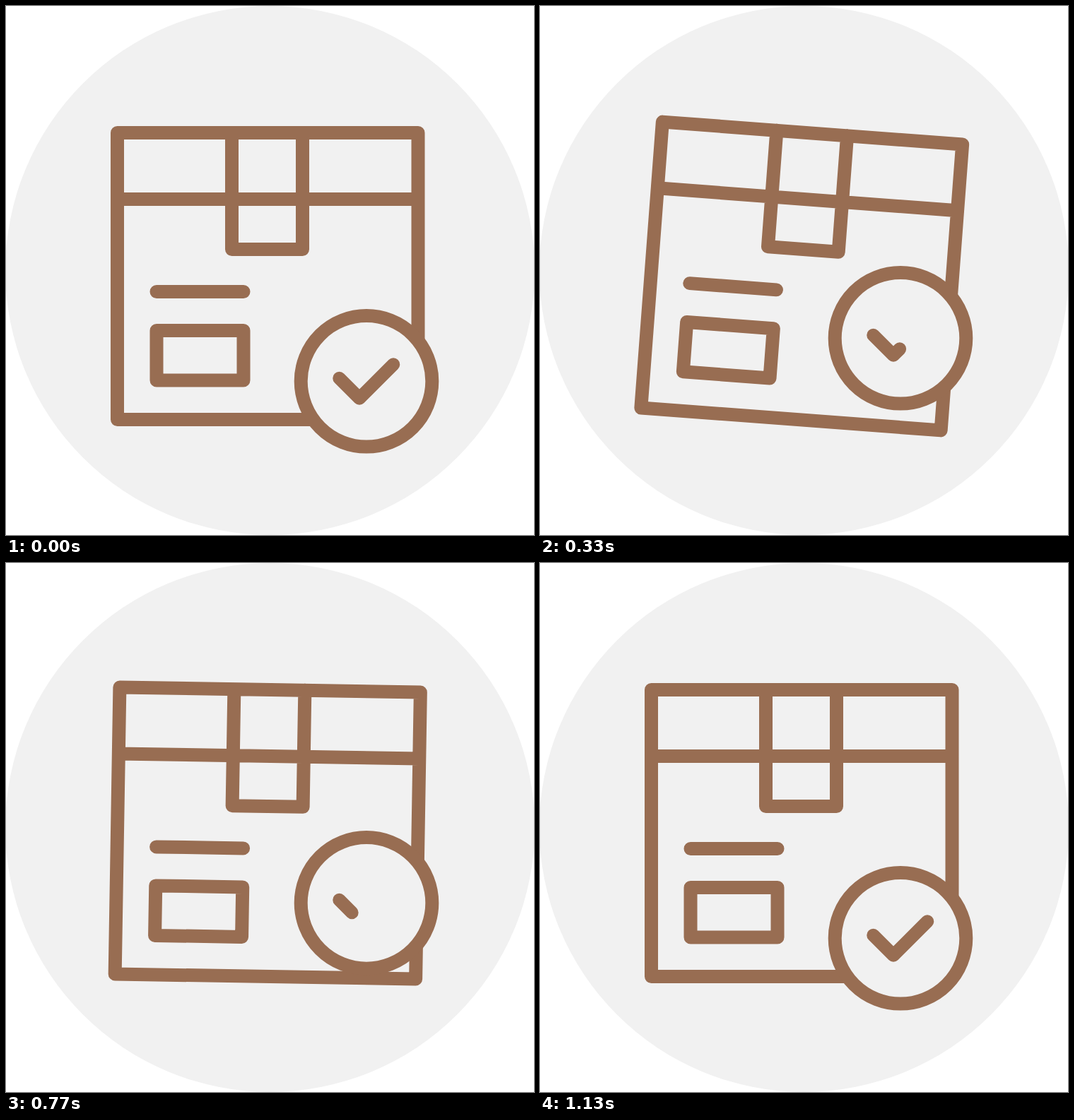
An HTML page that plays this animation: 747 px wide and 749 px high, repeating every 1670 ms.

```html
<!DOCTYPE html>
<html lang="en">
<head>
<meta charset="utf-8">
<title>Parcel delivered</title>
<style>
  html, body { margin: 0; width: 100%; height: 100%; overflow: hidden; background: #fff; }
  svg { display: block; width: 747px; height: 749px; }
  .ink { fill: none; stroke: #986d52; stroke-width: 19; stroke-linecap: round; stroke-linejoin: round; }
</style>
</head>
<body>
<svg viewBox="0 0 747 749">
  <circle cx="373.5" cy="374.5" r="374.5" fill="#f1f1f1"/>
  <g id="box" class="ink">
    <path d="M157.5 179.5H583V585.5H157.5Z M157.5 273.5H583 M319.5 179.5V344.5H419.5V179.5"/>
    <path d="M213 404.5H336 M213 459.5H336V530H213Z"/>
    <path id="corner" d="M574 576h-20l20-20z" fill="#986d52" stroke="none"/>
  </g>
  <g id="badge" class="ink">
    <circle cx="510" cy="531.3" r="92.8" fill="#f1f1f1"/>
    <path id="check" d="M471.5 527L500 555.5L548 507.5" pathLength="1" stroke-width="18.5"/>
  </g>
</svg>
<script>
const LOOP = 1670, FPS = 30;
const CX = 370.25, CY = 382.5;

// Keys are [step, value] pairs, joined by sine easing.
const TILT = [[4.4, 0], [11.8, 5], [18.7, -3.95], [25, 2.4], [30, 0]];
const LIFT = [[2, 0], [10, -61], [18, -14], [26, -66], [34, 0]];
const DRAWN = [[3, 1], [16.8, 0], [18.5, 0], [32.5, 1]];

const [box, corner, badge, check] =
  ["box", "corner", "badge", "check"].map(id => document.getElementById(id));

function at(keys, n) {
  if (n <= keys[0][0]) return keys[0][1];
  for (let i = 1; i < keys.length; i++) {
    const [a, from] = keys[i - 1], [b, to] = keys[i];
    if (n < b) return from + (to - from) * (1 - Math.cos(Math.PI * (n - a) / (b - a))) / 2;
  }
  return keys[keys.length - 1][1];
}

// Distance from the badge centre to the inner bottom-right corner of the box
function cornerGap(tilt, lift) {
  const r = tilt * Math.PI / 180, c = Math.cos(r), s = Math.sin(r);
  const x = CX + 203.25 * c - 193.5 * s, y = CY + 203.25 * s + 193.5 * c;
  return Math.hypot(x - 510, y - 531.3 - lift);
}

function draw(now) {
  const n = Math.floor((now % LOOP + 5) * FPS / 1000);
  const tilt = at(TILT, n), lift = at(LIFT, n), drawn = at(DRAWN, n);
  box.setAttribute("transform", `rotate(${tilt} ${CX} ${CY})`);
  badge.setAttribute("transform", `translate(0 ${lift})`);
  corner.style.display = cornerGap(tilt, lift) < 112 ? "" : "none";
  check.style.display = drawn > 0.001 ? "" : "none";
  check.setAttribute("stroke-dasharray", drawn < 1 ? `${drawn} 2` : "none");
}

const start = performance.now();
function tick() {
  draw(performance.now() - start);
  requestAnimationFrame(tick);
}
tick();
</script>
</body>
</html>
```
